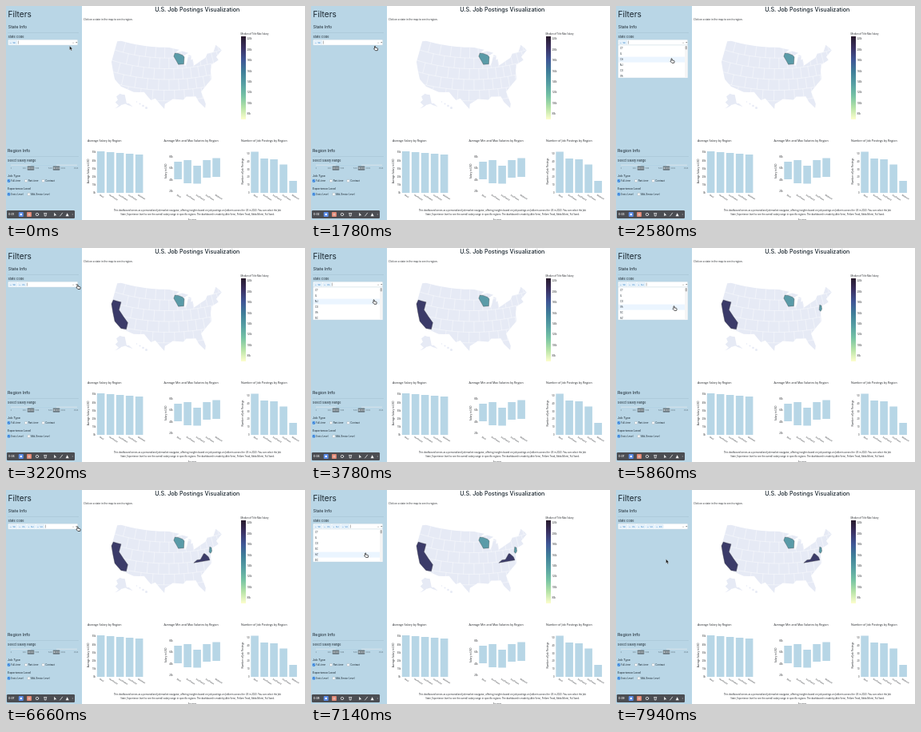
Recreate the animation shown at these times as an HTML page. Size 374 by 268 pixels, loop 8000 ms.

```html
<!DOCTYPE html>
<html lang="en">
<head>
<meta charset="utf-8">
<title>Job postings dashboard</title>
<style>
  html, body { margin: 0; width: 100%; height: 100%; overflow: hidden; background: #fff; }
  svg { display: block; width: 374px; height: 268px; }
  text { font-family: "Open Sans", sans-serif; fill: #1d2024; white-space: pre; }
  .ui { font-family: Inter, sans-serif; fill: #16222b; }
</style>
</head>
<body>
<svg id="stage" viewBox="0 0 374 268" xmlns="http://www.w3.org/2000/svg"></svg>
<script>
const LOOP = 8000;

// ---- drawing helpers ----
const rect = (x, y, w, h, fill, extra = '') =>
  `<rect x="${x}" y="${y}" width="${w}" height="${h}" fill="${fill}" ${extra}/>`;
const text = (x, y, size, str, extra = '') =>
  `<text x="${x}" y="${y}" font-size="${size}" ${extra}>${str}</text>`;
const ui = (x, y, size, str, extra = '') => text(x, y, size, str, `class="ui" ${extra}`);
const path = (d, extra) => `<path d="${d}" ${extra}/>`;
const repeat = (n, draw) => Array.from({ length: n }, (_, i) => draw(i)).join('');
const centered = 'text-anchor="middle"';

// ---- map: equal-area conic projection, longitudes given as degrees west ----
const rad = Math.PI / 180;
function albers(p1, p2, lon0, centerLon, centerLat, k, tx, ty) {
  const n = (Math.sin(p1 * rad) + Math.sin(p2 * rad)) / 2;
  const c = Math.cos(p1 * rad) ** 2 + 2 * n * Math.sin(p1 * rad);
  const raw = (lon, lat) => {
    const rho = Math.sqrt(c - 2 * n * Math.sin(lat * rad)) / n;
    const a = n * (lon0 - lon) * rad;
    return [rho * Math.sin(a), rho * Math.cos(a)];
  };
  const [cx, cy] = raw(centerLon, centerLat);
  return (lon, lat) => {
    const [x, y] = raw(lon, lat);
    return [tx + k * (x - cx), ty + k * (y - cy)];
  };
}
const K = 191, MX = 200.8, MY = 86.3;
const mainland = albers(29.5, 45.5, 96, 96.6, 38.7, K, MX, MY);
const alaska = albers(55, 65, 154, 156, 58.5, K * .35, MX - .307 * K, MY + .201 * K);

// Long segments are subdivided so that parallels come out curved.
function trace(points, proj = mainland) {
  const p = points.split(/\s*,\s*/).map(s => s.split(' ').map(Number));
  const out = [proj(...p[0])];
  for (let i = 1; i < p.length; i++) {
    const [a, b] = [p[i - 1], p[i]];
    const steps = Math.ceil(Math.abs(a[0] - b[0]) / 3) || 1;
    for (let s = 1; s <= steps; s++)
      out.push(proj(a[0] + (b[0] - a[0]) * s / steps, a[1] + (b[1] - a[1]) * s / steps));
  }
  return 'M' + out.map(q => q.map(v => v.toFixed(2)).join(' ')).join('L');
}

const coast = `124.7 48.4,122.7 49,95.2 49,89.6 48,92.1 46.8,88.2 47.4,84.8 46.5,87 45.7,88 44.6,87.3 41.6,
86.2 42.9,84.8 45.8,83.4 45.2,83.9 43.7,82.9 44,82.7 41.5,79 42.8,76.3 43.6,74.8 45,71.5 45,69.2 47.4,
67.8 46,67 44.8,70.7 43,70 41.7,74 40.7,75.1 38.4,75.6 35.3,77.9 33.9,81.2 31.5,80.1 26.7,80.6 25.2,
82.8 27.8,83.8 30,88 30.3,89.3 29.2,93.8 29.7,97.2 27.8,97.4 25.9,101.4 29.8,103.2 29,106.5 31.8,
111.1 31.3,117.1 32.5,120.6 34.5,124.4 40.4`;
const alaskaCoast = `141 69.6,156.5 71.3,166 68,161 64.5,166 61.5,158 58.6,164.8 54.7,152 59.2,144 60,
131 55.2,136 59.5,141 60.3`;

// Staggered rows of cells that get narrower towards the east.
function stateLines() {
  let d = '';
  for (let lat = 29, row = 0; lat < 49; lat += 4, row++) {
    d += trace(`125 ${lat},67 ${lat}`);
    for (let lon = 120 - row % 2 * 3; lon > 68; lon -= 2.5 + (lon - 67) * .07)
      d += trace(`${lon} ${lat},${lon} ${lat + 4}`);
  }
  return d;
}
function mapBase() {
  const land = 'fill="#e6eaf5"';
  const shape = trace(coast) + 'Z';
  return `<clipPath id="land">${path(shape, '')}</clipPath>` + path(shape, land)
    + path(stateLines(), 'fill="none" stroke="#fff" stroke-width=".4" clip-path="url(#land)"')
    + path(trace(alaskaCoast, alaska) + 'Z', land)
    + repeat(4, i => `<circle cx="${175.5 - 4 * i}" cy="${127.5 - 2.5 * i}" r="${1.5 - .25 * i}" ${land}/>`);
}

// ---- state picker ----
const TEAL = '#5a9ba8', INDIGO = '#3b3b69';
const picks = [
  { code: 'WI', picked: -LOOP, fill: TEAL, ring: '92.1 46.8,90.4 46.6,88.1 45.9,87.2 45.1,87.8 42.5,90.6 42.5,91.2 43.5,92.8 45.6' },
  { code: 'CA', opened: 2100, picked: 2740, x: 69, fill: INDIGO, ring: '124.1 42,120 42,120 39,114.6 35.1,114.7 32.6,117.1 32.5,120.6 34.5,124.4 40.4' },
  { code: 'NJ', opened: 3540, picked: 4460, x: 77.5, fill: TEAL, ring: '75.5 39.6,74.7 41.4,73.9 41,74.1 39.7,74.9 39' },
  { code: 'VA', opened: 5340, picked: 6060, x: 72, fill: INDIGO, ring: '83.7 36.6,82 37.5,80.3 37.5,78.3 39.4,77.7 39.3,76.3 37.9,76 36.6' },
  { code: 'DC', opened: 6940, picked: 7340, x: 62.5 },
];
const options = ['CT', 'IL', 'CA', 'NJ', 'CO', 'VA', 'SC', 'AZ', 'DC'];
const ROW = 7, LIST_TOP = 49.6;
const chosenAt = t => picks.filter(p => t >= p.picked);
const remaining = t => options.filter(o => !chosenAt(t).some(p => p.code === o));

// ---- charts ----
const regions = ['West', 'Northeast', 'Southwest', 'Southeast', 'Midwest'];
function chart({ title, titleX, label, labelX, x0, bars, tickX, tickY, tickGap, ticks }) {
  const cy = 207;
  return text(titleX, 169.5, 3.65, title)
    + text(labelX, cy, 3, label, `${centered} transform="rotate(-90 ${labelX} ${cy})"`)
    + ticks.map((s, i) => text(tickX, tickY + i * tickGap + .9, 2.6, s, 'text-anchor="end"')).join('')
    + bars.map(([top, bottom], i) => {
      const x = x0 + i * 12, lx = x + 3;
      return rect(x, top, 9.6, bottom - top, '#b7d6e6')
        + text(lx, 237.2, 2.6, regions[i], `transform="rotate(32 ${lx} 237.2)"`);
    }).join('');
}
const countdown = (from, step, count, unit = '') => Array.from({ length: count }, (_, i) => from - i * step + unit);

function charts() {
  return chart({ title: 'Average Salary by Region', titleX: 102, label: 'Average Salary in USD', labelX: 104,
      x0: 113.8, bars: regions.map((_, i) => [182 + i, 234]),
      tickX: 112, tickY: 183.5, tickGap: 10.1, ticks: countdown(50, 10, 6, 'k') })
    + chart({ title: 'Average Min and Max Salaries by Region', titleX: 197.5, label: 'Salary in USD', labelX: 201,
      x0: 210.3, bars: [[195, 217], [193, 222], [200, 222.5], [193, 215], [190.5, 214]],
      tickX: 208.5, tickY: 189, tickGap: 14.3, ticks: countdown(80, 20, 4, 'k') })
    + chart({ title: 'Number of Job Postings by Region', titleX: 294, label: 'Number of Job Postings', labelX: 297.3,
      x0: 306.3, bars: [182.5, 191, 192, 198.5, 219].map(top => [top, 234]),
      tickX: 304.5, tickY: 185, tickGap: 9.8, ticks: countdown(50, 10, 6) });
}

function colorbar() {
  const stops = ['#281a2c', '#3b3264', '#3f5796', '#3f7f99', '#569fa3', '#75c2a4', '#b5e3a7', '#fdfecc'];
  return `<defs><linearGradient id="deep" x2="0" y2="1">${stops.map((c, i) =>
      `<stop offset="${i / 7}" stop-color="${c}"/>`).join('')}</linearGradient></defs>`
    + rect(294, 38, 6, 104, 'url(#deep)')
    + text(293.5, 36, 2.85, 'Median of Title Max Salary')
    + countdown(220, 20, 8, 'k').map((s, i) => text(301.5, 42.4 + i * 13.4, 2.7, s)).join('');
}

// ---- sidebar ----
function checkbox(x, y, label, on) {
  return rect(x, y - 3, 3, 3, on ? '#1f74d8' : '#fff', `rx=".5" stroke="${on ? '#1f74d8' : '#858d93'}" stroke-width=".3"`)
    + (on ? path(`M${x + .6} ${y - 1.5}l.7.7 1.2-1.5`, 'fill="none" stroke="#fff" stroke-width=".5"') : '')
    + ui(x + 4.2, y - .4, 2.9, label);
}
function sidebar() {
  const divider = y => rect(2, y, 89, .4, '#86a3b3', 'opacity=".5"');
  const thumb = (x, label) => rect(x - 4.3, 200.6, 8.6, 5.2, '#6c7a82', 'rx=".8"')
    + ui(x, 204.2, 2.4, label, `style="fill:#fff" ${centered}`);
  return rect(0, 0, 95, 268, '#b9d6e6')
    + ui(2.6, 14.4, 10.1, 'Filters')
    + ui(2.8, 28.3, 5.2, 'State Info') + divider(33) + ui(2.5, 39.6, 3.8, 'State Code')
    + ui(2, 183.3, 5.3, 'Region Info') + divider(188)
    + ui(2, 194.8, 3.75, 'Select Salary Range')
    + rect(6, 198.8, 83, .8, '#dfe8ed') + rect(31, 198.8, 32, .8, '#9fcbe2')
    + repeat(6, i => ui(6.5 + i * 16.2, 204, 2.2, i ? i * 50 + 'k' : 0, `${centered} opacity=".55"`))
    + thumb(31, '80000') + thumb(63, '180000')
    + ui(2, 213.8, 3.6, 'Job Type')
    + ['Full-time', 'Part-time', 'Contract'].map((s, i) => checkbox(2 + i * 21.5, 220.4, s, !i)).join('')
    + ui(2, 230.4, 3.6, 'Experience Level')
    + checkbox(2, 237.2, 'Entry Level', true) + checkbox(27, 237.2, 'Mid-Senior Level');
}
function toolbar() {
  const line = 'fill="none" stroke="#e4e4e6" stroke-width=".8" stroke-linecap="round"';
  return rect(1, 256, 85, 10, '#4b4d52', 'rx="1.2"')
    + rect(15.8, 258, 6, 6, '#5b8be6', 'rx="1"') + rect(17.7, 259.9, 2.2, 2.2, '#fff')
    + rect(26, 258, 6, 6, '#df8470', 'rx="1"') + path('M28.2 260v2.2M29.8 260v2.2', line)
    + `<circle cx="39" cy="261" r="1.7" ${line}/>`
    + path('M47.6 259.6h3.2M48 259.8l.3 3.2h1.8l.3-3.2', line)
    + path('M60.2 258.7v4.6l1.2-1.1 1.8 0z', 'fill="#f2f2f2"')
    + path('M67.6 263l3-3.8', line) + path('M74.6 263.2l2-4 2 4z', 'fill="#f2f2f2"')
    + path('M83.2 261h.1', line);
}

function scenery() {
  const footer = (y, str) => text(239.5, y, 2.85, str, centered);
  return rect(0, 0, 374, 268, '#fff') + sidebar()
    + ui(239.3, 7.4, 7.2, 'U.S. Job Postings Visualization', `${centered} font-weight="500"`)
    + text(97, 17.8, 3.05, 'Click on a state in the map to see its region.')
    + mapBase() + colorbar() + charts()
    + footer(257, 'This dashboard serves as a personalized job market navigator, offering insights based on job postings on Joblorin across the US in 2023. You can select the Job')
    + footer(262.2, 'State, Experience level to see the overall salary range in specific regions. The dashboard is made by Arlo Venn, Pellam Trosk, Edda Morin, Yul Sand.')
    + text(233, 269.2, 2.85, 'Sources', centered)
    + toolbar();
}

// ---- moving parts ----
// The pointer goes to the control, opens the list, goes to a row, picks it, and returns.
const stops = [{ at: 0, x: 79.5, y: 50 }];
picks.slice(1).forEach((p, i) => {
  const row = remaining(p.picked - 1).indexOf(p.code);
  stops.push({ at: i ? picks[i].picked : 1780, x: 89, y: 45.8 },
    { at: p.opened, x: p.x, y: LIST_TOP + ROW * row + 2 });
});
function pointerAt(t) {
  const i = stops.filter(s => s.at <= t).length - 1;
  const to = stops[i], from = stops[i - 1] || to;
  const u = Math.min(1, (t - to.at) / 280), e = u * u * (3 - 2 * u);
  return [from.x + (to.x - from.x) * e, from.y + (to.y - from.y) * e];
}
function pointer(t) {
  const [x, y] = pointerAt(t);
  const arrow = t < 1780 || t >= 7380;
  const d = arrow ? 'M0 0V5.2L1.2 4.1 2.1 6.1 3 5.7 2.1 3.8H3.7Z'
    : 'M0 .5Q.6-.3 1.1.5V2.3L3.5 2.8Q4.2 3 4.1 3.8L3.7 5.7H.9L-.9 3.8Q-.9 3 0 3.3Z';
  return path(d, `transform="translate(${x.toFixed(2)} ${y.toFixed(2)})" fill="${arrow ? '#111' : '#fff'}" stroke="${arrow ? '#fff' : '#111'}" stroke-width="${arrow ? .3 : .7}"`);
}
function control(t) {
  const chosen = chosenAt(t), pitch = 11.3;
  return rect(2.7, 42.2, 87, 6.8, '#fff', 'rx=".8" stroke="#c4d4de" stroke-width=".4"')
    + chosen.map((p, i) => {
      const x = 4 + i * pitch;
      return rect(x, 43.5, 10, 4.3, '#e8f3fc', 'rx=".5" stroke="#bcdaf0" stroke-width=".3"')
        + ui(x + 1, 46.7, 2.8, '×', 'style="fill:#4a90d0"') + ui(x + 4.6, 46.7, 2.7, p.code, 'style="fill:#2f7fc6"');
    }).join('')
    + (t < 7380 ? rect(4 + chosen.length * pitch, 43.6, .35, 4, '#333') : '')
    + ui(83, 46.8, 3.2, '×', 'style="fill:#888"') + path('M87 45h2.4l-1.2 1.4z', 'fill="#888"');
}
function dropdown(t) {
  if (!picks.some(p => t >= p.opened && t < p.picked)) return '';
  const hovered = Math.floor((pointerAt(t)[1] + .5 - LIST_TOP) / ROW);
  return rect(2.7, 49, 87, 41, '#fff', 'stroke="#c4d4de" stroke-width=".4"')
    + remaining(t).slice(0, 6).map((code, i) => {
      const y = LIST_TOP + i * ROW;
      return (i === hovered ? rect(3, y, 83, Math.min(ROW, 89.8 - y), '#ebf5ff') : '') + ui(5, y + 4.6, 2.9, code);
    }).join('')
    + rect(86, 49.3, 3.5, 40.5, '#f5f5f5') + rect(86.6, 50, 2.3, 4.5, '#b4b4b4', 'rx="1"');
}

const stage = document.getElementById('stage');
stage.innerHTML = scenery() + '<g id="live"></g>';
const live = document.getElementById('live');
const shapes = picks.filter(p => p.ring).map(p => ({ ...p, d: trace(p.ring) + 'Z' }));

function render(t) {
  const shaded = shapes.filter(p => t >= p.picked + 120);
  live.innerHTML = shaded.map(p => path(p.d, `fill="${p.fill}" stroke="#444" stroke-width=".35"`)).join('')
    + control(t) + dropdown(t)
    + ui(3.3, 262.1, 3.2, `0:0${Math.floor((t + 1200) / 1000)}`, 'style="fill:#fff" font-weight="600"')
    + pointer(t);
}
const start = performance.now();
function tick() {
  render((performance.now() - start) % LOOP);
  requestAnimationFrame(tick);
}
tick();
</script>
</body>
</html>
```
